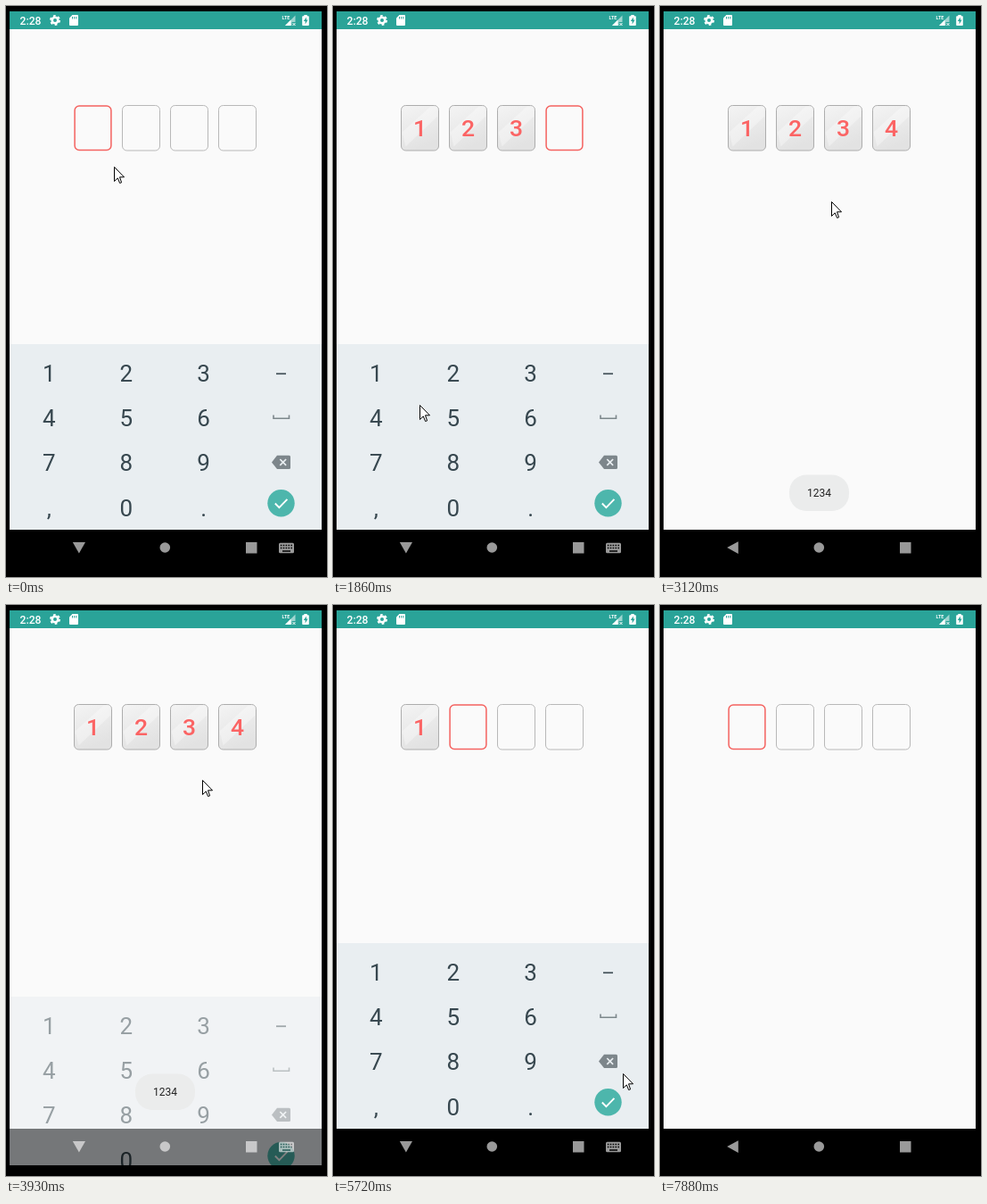
Animation of 360 by 640 pixels, one loop 8.48 s. Source, as an HTML page:

```html
<!DOCTYPE html>
<html lang="en">
<head>
<meta charset="utf-8">
<title>PIN entry</title>
<style>
  html, body { margin: 0; width: 100%; height: 100%; overflow: hidden; background: #000; }
  svg { display: block; width: 360px; height: 640px; font-family: Roboto, Arial, sans-serif; }
  .keys { font-size: 26px; fill: #37474f; text-anchor: middle; }
  .pin { font-size: 26.5px; font-weight: 500; fill: #fb6464; text-anchor: middle; }
</style>
</head>
<body>
<svg viewBox="0 0 360 640">
  <defs>
    <linearGradient id="tile" x1="0" y1="0" x2=".35" y2="1">
      <stop offset="0" stop-color="#f4f4f4"/>
      <stop offset="1" stop-color="#e2e2e2"/>
    </linearGradient>
    <clipPath id="screen"><rect x="4" y="6" width="350" height="622"/></clipPath>
  </defs>
  <rect width="360" height="640"/>
  <rect x="4" y="6" width="350" height="581" fill="#fafafa"/>
  <rect x="4" y="6" width="350" height="20" fill="#2aa398"/>

  <g fill="#fff">
    <text x="15.5" y="20.5" font-size="12.2" font-weight="500">2:28</text>
    <circle cx="55" cy="16" r="3.3" fill="none" stroke="#fff" stroke-width="2.6"/>
    <circle cx="55" cy="16" r="5.1" fill="none" stroke="#fff" stroke-width="1.8" stroke-dasharray="2.7 2.64"/>
    <path d="M74.5 10H80q1 0 1 1V21q0 1-1 1H72q-1 0-1-1V13.5Z"/>
    <path d="M74.5 12v2.5M76.7 12v2.5M78.9 12v2.5" stroke="#2aa398"/>
    <text x="309.5" y="15" font-size="5.4" font-weight="700">LTE</text>
    <path d="M313 22L324.5 10.5V18H320.5V22Z" fill-opacity=".55"/>
    <path d="M313 22L319.5 15.5V22Z"/>
    <path d="M321.5 19l3 3m0-3l-3 3" stroke="#fff"/>
    <path d="M334.3 10h3.4v1.2H339q.8 0 .8.8v9.2q0 .8-.8.8h-6q-.8 0-.8-.8V12q0-.8.8-.8h1.3Z"/>
    <path d="M336.8 12.5l-3 4.6h1.8v3.4l3-4.9h-1.8Z" fill="#2aa398"/>
  </g>

  <g id="boxes"></g>

  <g clip-path="url(#screen)">
    <g id="keyboard">
      <rect x="4" y="379" width="350" height="208" fill="#e9eef1"/>
      <rect id="pressed" width="87.5" height="50" fill="#dde9dc"/>
      <g id="keys" class="keys"></g>
      <rect x="303" y="411.3" width="11" height="1.8" fill="#4a585f"/>
      <path d="M300 458.5v3.8h17.5v-3.8" fill="none" stroke="#7d878c" stroke-width="1.6"/>
      <g id="erase">
        <path d="M304 503.8H317.5q1.5 0 1.5 1.5V517.6q0 1.5-1.5 1.5H304L298 511.4Z"/>
        <path d="M307.3 508l6.8 6.8m0-6.8l-6.8 6.8" stroke="#e9eef1" stroke-width="1.7"/>
      </g>
      <circle id="done" cx="308.5" cy="557.2" r="15.2"/>
      <path d="M301.8 557.5l4.6 4.6 9-9.2" fill="none" stroke="#fff" stroke-width="1.9"/>
    </g>
  </g>

  <g id="toast">
    <rect x="145" y="525.5" width="67" height="40.5" rx="19" fill="#ebecec"/>
    <text x="178.5" y="550" font-size="12" fill="#222" text-anchor="middle">1234</text>
  </g>

  <g fill="#fff" fill-opacity=".6">
    <path id="back"/>
    <circle cx="178.3" cy="607" r="5.8"/>
    <rect x="269" y="601" width="12.5" height="12.5"/>
    <path id="switcher" fill-rule="evenodd"/>
  </g>

  <path id="cursor" d="M.5.5V16.5L4.3 12.9 6.6 18.5 8.6 17.8 6.5 11.8H11.5Z" fill="#fff" stroke="#000"/>
</svg>

<script>
const LOOP = 8480;
// The screen refreshes in bursts and rests between them: [start, refreshes]
const REFRESH = 135;
const BURSTS = [[0, 1], [150, 8], [1230, 8], [2280, 8], [3420, 3], [3930, 7], [5050, 7], [6180, 4], [6880, 2], [7340, 5]];

const HIDE = 2030, SHOW = 3774, HIDE_AGAIN = 6630, SLIDE = 312;
const typedAt = i => 450 + 480 * i;
const erasedAt = i => 5040 + 220 * (3 - i);
const DIGITS = [0, 1, 2, 3];

// Pointer stops: [time, x, y]
const STOPS = [
  [0, 121, 180], [450, 48, 420], [930, 130, 420], [1410, 222, 415], [1890, 55, 458],
  [2280, 55, 458], [3225, 215, 179], [3540, 246, 141], [3930, 220, 196],
  [4740, 325, 525], [6180, 325, 525], [6460, 314, 554], [7200, 314, 554], [7880, 290, 650]
];

const $ = id => document.getElementById(id);
const between = (t, from, to) => t >= from && t < to;
const ramp = (t, from, length) => Math.min(1, Math.max(0, (t - from) / length));
const show = (el, on) => el.setAttribute('visibility', on ? 'visible' : 'hidden');
const filled = (i, t) => between(t, typedAt(i), erasedAt(i));

function refreshTime(time) {
  const [start, count] = BURSTS.filter(burst => burst[0] <= time).pop();
  return start + REFRESH * Math.min(count - 1, Math.floor((time - start) / REFRESH));
}

function pointerAt(t) {
  const next = STOPS.findIndex(stop => stop[0] > t);
  const [, ...end] = STOPS.at(next);
  if (next < 0) return end;
  const [from, ...begin] = STOPS[next - 1];
  const k = ramp(t, from, STOPS[next][0] - from);
  return begin.map((v, axis) => Math.round(v + (end[axis] - v) * k));
}

$('boxes').innerHTML = DIGITS.map(i => `
  <g transform="translate(${76.5 + i * 54} 111.5)">
    <rect class="frame" rx="5"/>
    <path class="shine" d="M1 30L33 1H41V12L5 46Z" fill="#fff" fill-opacity=".32"/>
    <text class="pin">${i + 1}</text>
  </g>`).join('');
const boxes = [...$('boxes').children].map(g => g.children);

$('keys').innerHTML = [...'123456789,0.'].map((key, i) =>
  `<text x="${48.2 + i % 3 * 86.7}" y="${421 + Math.floor(i / 3) * 50.2}">${key}</text>`).join('');

let switcher = 'M307.5 601.8H321.5Q323 601.8 323 603.3V611.8Q323 613.3 321.5 613.3H307.5Q306 613.3 306 611.8V603.3Q306 601.8 307.5 601.8ZM310 610.2h9v1.5h-9Z';
for (let row = 0; row < 2; row++)
  for (let col = 0; col < 5; col++)
    switcher += `M${307.8 + col * 2.9} ${603.7 + row * 3}h1.6v1.6h-1.6Z`;
$('switcher').setAttribute('d', switcher);

function drawBoxes(t) {
  const active = DIGITS.findIndex(i => !filled(i, t));
  boxes.forEach(([frame, shine, digit], i) => {
    const full = filled(i, t);
    const inset = i === active ? .6 : 0;
    const look = {
      x: inset, y: inset, width: 42 - 2 * inset, height: 50.5 - 2 * inset,
      fill: full ? 'url(#tile)' : 'none',
      stroke: i === active ? '#f4625f' : full ? '#adadad' : '#b8b8b8',
      'stroke-width': i === active ? 1.5 : 1
    };
    for (const name in look) frame.setAttribute(name, look[name]);
    show(shine, full);
    show(digit, full);
    const scale = 1 - (1 - ramp(t, typedAt(i), 150)) ** 2 / 2;
    digit.setAttribute('transform', `translate(21 ${25.4 + 9.4 * scale}) scale(${scale})`);
    digit.setAttribute('opacity', scale);
  });
}

function drawKeyboard(t) {
  const open = t < HIDE || between(t, SHOW, HIDE_AGAIN);
  const opacity = 1 - ramp(t, HIDE, SLIDE) + ramp(t, SHOW, SLIDE) - ramp(t, HIDE_AGAIN, SLIDE);
  const shift = (open ? 80 : 40) * (1 - opacity ** 2);
  $('keyboard').setAttribute('transform', `translate(0 ${shift})`);
  $('keyboard').setAttribute('opacity', opacity);

  // A key still held when the keyboard closes stays lit
  const last = DIGITS.filter(i => filled(i, t)).length - 1;
  show($('pressed'), last >= 0 && (t - typedAt(last) < 130 || !open));
  $('pressed').setAttribute('x', 4 + last % 3 * 87);
  $('pressed').setAttribute('y', 387 + Math.floor(last / 3) * 50);

  const erasing = DIGITS.some(i => between(t, erasedAt(i), erasedAt(i) + 100));
  $('erase').setAttribute('fill', erasing ? '#4b585e' : '#7d868b');
  $('done').setAttribute('fill', between(t, 6550, 6800) ? '#05a59b' : '#4db6ac');

  $('back').setAttribute('d', open ? 'M74.8 601H89L81.9 613.6Z' : 'M87.8 600.2V614L75.2 607.1Z');
  show($('switcher'), open);
}

function render(time) {
  const t = refreshTime(time);
  drawBoxes(t);
  drawKeyboard(t);
  $('toast').setAttribute('opacity', ramp(t, 2330, 150) - ramp(t, 4380, 220));
  $('cursor').setAttribute('transform', `translate(${pointerAt(t)})`);
}

const start = performance.now();
function tick() {
  render((performance.now() - start) % LOOP);
  requestAnimationFrame(tick);
}
tick();
</script>
</body>
</html>
```
